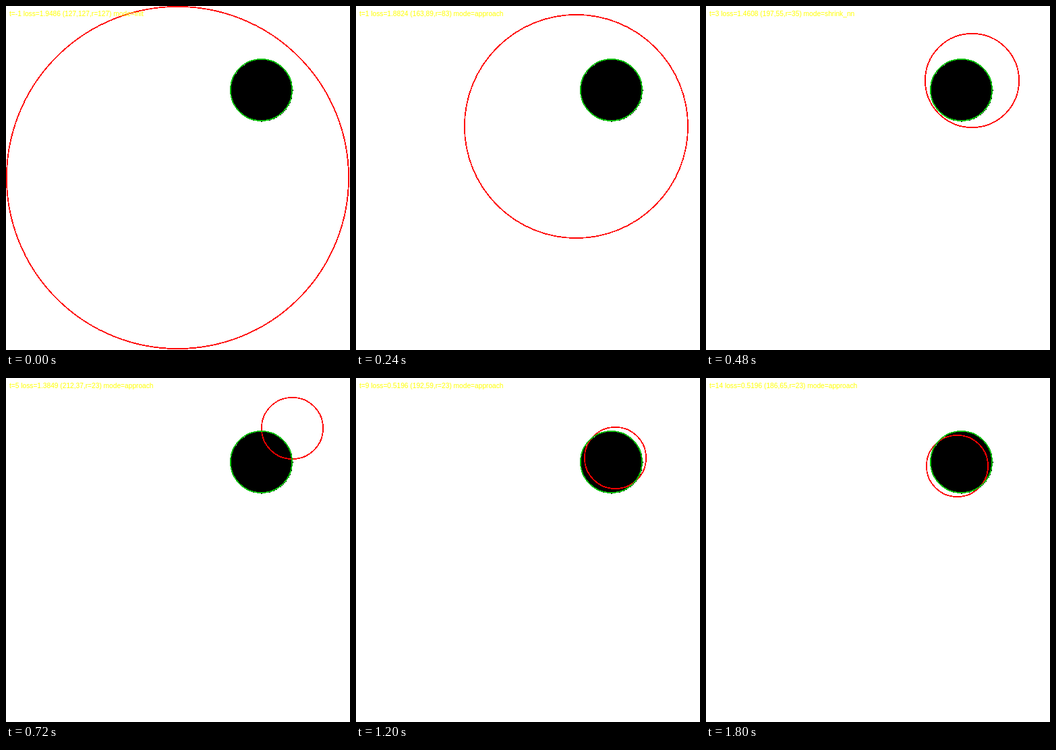
An HTML page that plays this animation: 510 by 510 pixels, repeating every 1920 ms.

```html
<!DOCTYPE html>
<html lang="en">
<head>
<meta charset="utf-8">
<title>Circle fitting</title>
<style>
  html, body { margin: 0; width: 100%; height: 100%; overflow: hidden; background: #fff; }
  svg { display: block; width: 510px; height: 510px; }
  circle { fill: none; stroke-width: 1.8; shape-rendering: crispEdges; }
  text { font: 10.2px "Liberation Sans", Arial, sans-serif; fill: #ff0; }
</style>
</head>
<body>
<svg viewBox="0 0 510 510">
  <path id="disc" shape-rendering="crispEdges"/>
  <circle id="guess" stroke="#f00"/>
  <circle id="goal" stroke="#00c000"/>
  <text id="label" x="5" y="15"></text>
</svg>
<script>
const STEP = 120, SCALE = 2;
const target = [189, 62, 23];

// x, y, radius, loss, mode for each search step, starting at t = -1
const steps = [
  [127, 127, 127, 1.9486, 'init'],
  [145, 108, 105, 1.9249, 'approach'],
  [163, 89, 83, 1.8824, 'approach'],
  [180, 72, 59, 1.7655, 'approach'],
  [197, 55, 35, 1.4608, 'shrink_nn'],
  [205, 46, 29, 1.4216, 'shrink_nn'],
  [212, 37, 23, 1.3849, 'approach'],
  [207, 42, 23, 1.2053, 'approach'],
  [202, 48, 23, 0.9871, 'approach'],
  [197, 53, 23, 0.7624, 'approach'],
  [192, 59, 23, 0.5196, 'approach'],
  [188, 63, 23, 0.4327, 'approach'],
  [186, 65, 23, 0.5196, 'approach'],
  [185, 66, 23, 0.5624, 'approach'],
  [186, 65, 23, 0.5196, 'approach'],
  [186, 65, 23, 0.5196, 'approach']
];

const byId = id => document.getElementById(id);
const guess = byId('guess'), label = byId('label');

function place(circle, [x, y, r]) {
  circle.setAttribute('cx', x * SCALE + 0.5);
  circle.setAttribute('cy', y * SCALE + 0.5);
  circle.setAttribute('r', r * SCALE - 0.4);
}

// Disc made of double-size pixels
function discPath([x, y, r]) {
  let d = '';
  for (let row = -r; row <= r; row++) {
    const half = Math.floor(Math.sqrt(r * r - row * row));
    const width = (2 * half + 1) * SCALE;
    d += `M${(x - half) * SCALE} ${(y + row) * SCALE}h${width}v${SCALE}h${-width}z`;
  }
  return d;
}

function draw(now) {
  const i = Math.floor(now / STEP) % steps.length;
  const [x, y, r, loss, mode] = steps[i];
  place(guess, steps[i]);
  label.textContent = `t=${i - 1} loss=${loss.toFixed(4)} (${x},${y},r=${r}) mode=${mode}`;
}

byId('disc').setAttribute('d', discPath(target));
place(byId('goal'), target);

const start = performance.now();
function tick() {
  draw(performance.now() - start);
  requestAnimationFrame(tick);
}
tick();
</script>
</body>
</html>
```
